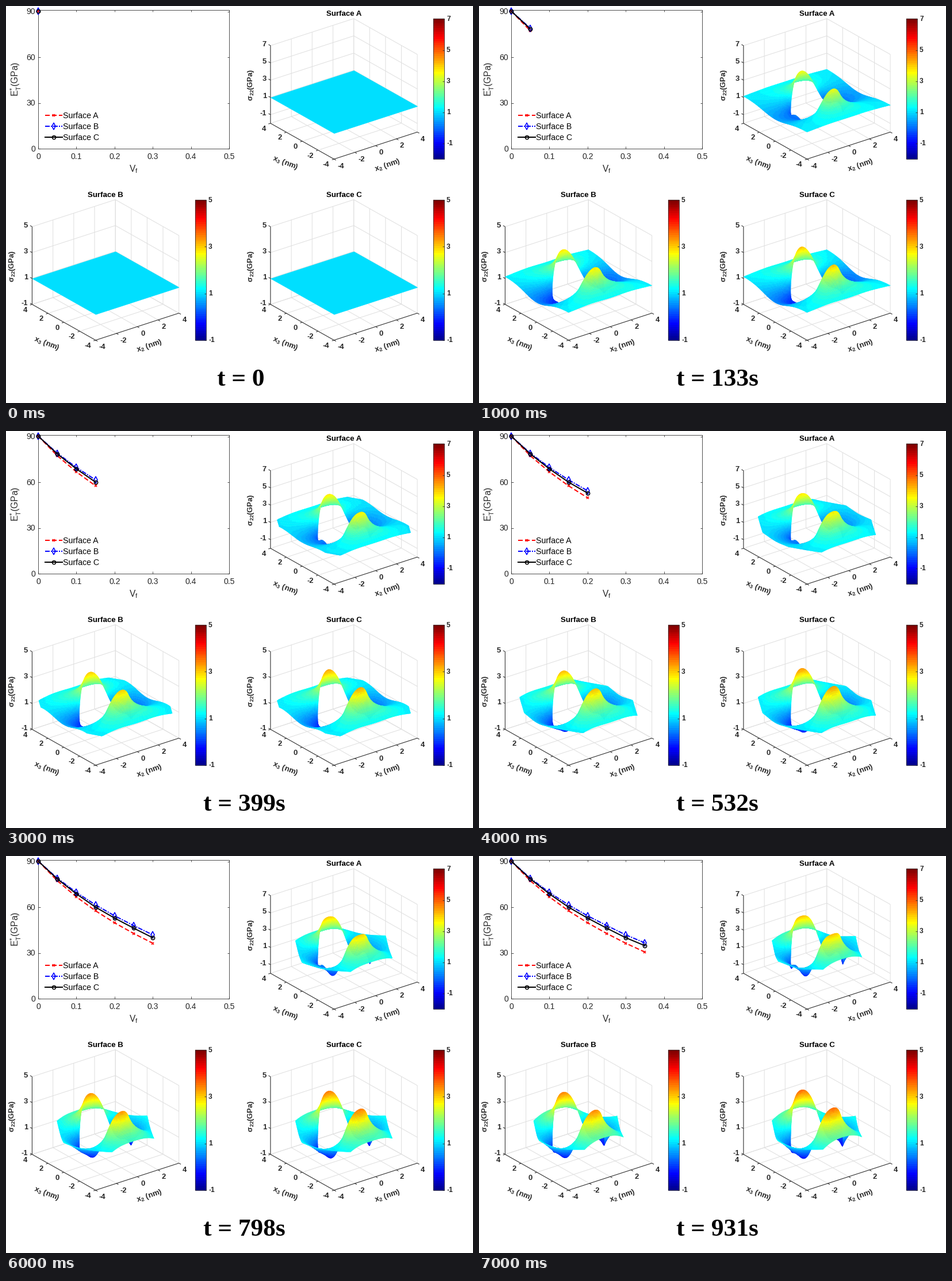
These frames come from a looping animation (812x690 px, 8 s). A matplotlib script:

```python
import numpy as np
import matplotlib.pyplot as plt
from matplotlib.animation import FuncAnimation
from matplotlib.collections import LineCollection, PolyCollection
from matplotlib.patches import Rectangle

W, H, DPI = 812, 690, 100
PT = 72 / DPI
INK, GRID = "#262626", "#dfdfdf"
STEPS = 8
HOLE = 2.0

plt.rcParams["font.family"] = "Liberation Sans"
plt.rcParams["axes.unicode_minus"] = False

# the small surplus keeps the pixel size from rounding down
fig = plt.figure(figsize=((W + 0.01) / DPI, (H + 0.01) / DPI), dpi=DPI, facecolor="white")
ax = fig.add_axes([0, 0, 1, 1])
ax.set_xlim(0, W)
ax.set_ylim(H, 0)
ax.axis("off")


def text(x, y, s, px, ha="center", va="center", **kw):
    return ax.text(x, y, s, fontsize=px * PT, ha=ha, va=va, **kw)


def segments(segs, color, px, z):
    ax.add_collection(LineCollection(segs, colors=color, linewidths=px * PT, zorder=z))


def sub(s):
    return r"$_{\mathdefault{%s}}$" % s


def jet(v):
    """64-step rainbow for v in 0..1."""
    i = (np.clip(np.floor(np.asarray(v) * 64), 0, 63) + 1) / 64
    return np.stack([np.clip(1.5 - np.abs(4 * i - c), 0, 1) for c in (3, 2, 1)], axis=-1)


# ---- stress field around a hexagonal array of holes ----

def ripple(x, y):
    """Change of the axial stress caused by one hole at the origin."""
    s = HOLE ** 2 / (x * x + y * y)
    a = np.arctan2(y, x)
    c2, c4 = np.cos(2 * a), np.cos(4 * a)
    return -s * (1.5 * c2 + c4) + 1.5 * s * s * c4


def array_stress(x, y, vf, apothem):
    total = 1 + ripple(x, y)
    for a in np.radians(np.arange(30, 390, 60)):
        total = total + ripple(x - 2 * apothem * np.cos(a), y - 2 * apothem * np.sin(a))
    return total / (1 - 0.65 * vf)


def cell_radius(a, apothem):
    """Distance to the rim of the hexagon cut by the +-4 box."""
    rim = np.full_like(a, np.inf)
    sides = [(d, apothem) for d in range(30, 390, 60)] + [(d, 4.0) for d in range(0, 360, 90)]
    for deg, dist in sides:
        c = np.cos(a - np.radians(deg))
        rim = np.minimum(rim, np.where(c > 0.05, dist / np.maximum(c, 0.05), np.inf))
    return rim


def surface(vf, rim_values):
    """Grid of x2, x3 and stress; rim_values are (base, slope) at 0, 30, 60, 90 degrees."""
    apothem = np.sqrt(np.pi * HOLE ** 2 / vf / (2 * np.sqrt(3)))
    a = np.linspace(0, 2 * np.pi, 241)[None, :]
    t = np.linspace(0, 1, 27)[:, None] ** 1.4
    r = HOLE + (cell_radius(a, apothem) - HOLE) * t
    x, y = r * np.cos(a), r * np.sin(a)

    key = np.radians([0, 30, 60, 90])
    want = np.array([b + m * vf for b, m in rim_values])
    have = array_stress(HOLE * np.cos(key), HOLE * np.sin(key), vf, apothem)
    waves = 2 * np.arange(4)
    coef = np.linalg.solve(np.cos(np.outer(key, waves)), want - have)
    fix = sum(c * np.cos(n * a) for c, n in zip(coef, waves))
    return x, y, array_stress(x, y, vf, apothem) + fix * (HOLE / r) ** 4


# ---- 3D panels ----

class Panel:
    def __init__(self, name, ox, oy, lo, hi, bar_x, label_x, rim_values):
        self.ox, self.oy, self.lo, self.hi = ox, oy, lo, hi
        self.rim_values = rim_values
        self.ticks = range(-1, hi + 1, 2)
        self.frame()
        self.labels(name)
        self.colorbar(bar_x, label_x)
        self.mesh = PolyCollection([], linewidths=0.35, zorder=3)
        ax.add_collection(self.mesh)

    def project(self, x, y, z):
        px = self.ox + 18.1 * x - 13.8 * y
        py = self.oy - 5.87 * x - 7.78 * y - (z - self.lo) * 135 / (self.hi - self.lo)
        return px, py

    def path(self, *pts):
        return [self.project(*p) for p in pts]

    def frame(self):
        lo, hi = self.lo, self.hi
        grid = []
        for v in range(-4, 5, 2):
            grid.append(self.path((v, -4, lo), (v, 4, lo), (v, 4, hi)))
            grid.append(self.path((-4, v, lo), (4, v, lo), (4, v, hi)))
        for v in self.ticks:
            grid.append(self.path((-4, 4, v), (4, 4, v), (4, -4, v)))
        segments(grid, GRID, 1, 1)

        dark = [self.path((-4, 4, hi), (-4, 4, lo), (-4, -4, lo), (4, -4, lo))]
        for v in range(-4, 5, 2):
            dark.append(self.path((v, -4, lo), (v, -4.25, lo)))
            dark.append(self.path((-4, v, lo), (-4.2, v, lo)))
        for v in self.ticks:
            dark.append(self.path((-4, 4, v), (-4, 4.25, v)))
        segments(dark, INK, 1, 2)

    def labels(self, name):
        bold = dict(weight="bold", color=INK)
        for v in range(-4, 5, 2):
            x, y = self.project(-4, v, self.lo)
            text(x - 8, y + 10, str(v), 13, ha="right", **bold)
            x, y = self.project(v, -4, self.lo)
            text(x + 6, y + 12.5, str(v), 13, ha="left", **bold)
        for v in self.ticks:
            x, y = self.project(-4, 4, v)
            text(x - 7, y - 1.5, str(v), 13, ha="right", **bold)
        x, y = self.ox, self.oy
        text(x, y - 197.5, name, 13.2, weight="bold", color="black")
        turn = dict(rotation_mode="anchor", **bold)
        text(x - 102, y + 61, "x" + sub(3) + " (nm)", 13.2, rotation=-21, **turn)
        text(x + 76, y + 65, "x" + sub(2) + " (nm)", 13.2, rotation=19, **turn)
        text(x - 162, y - 74, "σ" + sub(22) + "(GPa)", 13, rotation=90, **turn)

    def colorbar(self, x, label_x):
        top, h, w = self.oy - 189, 243.5, 19
        step = h / 64
        ys = top + h - step * np.arange(65)
        bands = [[(x, a), (x + w, a), (x + w, b), (x, b)] for a, b in zip(ys[:-1], ys[1:])]
        ax.add_collection(PolyCollection(bands, facecolors=jet((np.arange(64) + 0.5) / 64),
                                         edgecolors="face", linewidths=0.2, zorder=2))
        ax.add_patch(Rectangle((x, top), w, h, fill=False, ec=INK, lw=0.8 * PT, zorder=3))
        marks = []
        for v in self.ticks:
            y = top + h * (self.hi - v) / (self.hi - self.lo)
            marks.append([(x + w - 3, y), (x + w, y)])
            text(label_x, y + 0.5, str(v), 12, ha="left", weight="bold", color=INK)
        segments(marks, INK, 0.8, 4)

    def show(self, vf):
        if vf == 0:
            side = np.linspace(-4, 4, 2)
            x, y = np.meshgrid(side, side)
            z = np.ones_like(x)
        else:
            x, y, z = surface(vf, self.rim_values)

        def corners(m):
            return np.stack([m[:-1, :-1], m[1:, :-1], m[1:, 1:], m[:-1, 1:]], axis=-1)

        far = corners(5.87 * x + 7.78 * y).mean(-1).ravel()
        order = np.argsort(-far)
        px, py = (corners(m) for m in self.project(x, y, z))
        quads = np.stack([px, py], axis=-1).reshape(-1, 4, 2)
        level = (corners(z).mean(-1).ravel() - self.lo) / (self.hi - self.lo)
        colors = jet(level + 1e-9)
        self.mesh.set_verts(quads[order])
        self.mesh.set_facecolor(colors[order])
        self.mesh.set_edgecolor(colors[order])


panels = [
    Panel("Surface A", 587.5, 211.5, -2, 7, 743, 766,
          [(0.2, 0), (-0.25, -1.0), (1.75, 3.2), (3.43, 1.9)]),
    Panel("Surface B", 173, 526.2, -1, 5, 329, 352,
          [(0.05, -0.3), (0.15, -0.5), (1.75, 1.7), (2.78, 1.9)]),
    Panel("Surface C", 587.5, 526.2, -1, 5, 743, 766,
          [(0.0, -0.2), (0.1, -0.5), (1.8, 2.0), (2.99, 1.8)]),
]

# ---- modulus chart ----

LEFT, RIGHT, TOP, BASE = 56, 388, 7, 248


def chart_xy(vf, e):
    return LEFT + (RIGHT - LEFT) * np.asarray(vf) / 0.5, BASE - 2.648 * np.asarray(e)


def build_chart():
    ax.add_patch(Rectangle((LEFT, TOP), RIGHT - LEFT, BASE - TOP, fill=False,
                           ec=INK, lw=0.8 * PT, zorder=2))
    marks = []
    for i in range(6):
        x, _ = chart_xy(i / 10, 0)
        marks += [[(x, BASE), (x, BASE - 3.5)], [(x, TOP), (x, TOP + 3.5)]]
        text(x, 262, f"{i / 10:g}", 14, color=INK)
    for e in range(0, 91, 30):
        _, y = chart_xy(0, e)
        marks += [[(LEFT, y), (LEFT + 3.5, y)], [(RIGHT, y), (RIGHT - 3.5, y)]]
        text(51, y + 0.5, str(e), 14, ha="right", color=INK)
    segments(marks, INK, 0.8, 2)
    text(222, 284, "V" + sub("f"), 15.5, color=INK)
    text(22, 127, r"E$_{\mathdefault{T}}^{\mathdefault{*}}$(GPa)", 15.5,
         va="baseline", rotation=90, rotation_mode="anchor", color=INK)


build_chart()

CURVES = [
    ("Surface A", "red", (0, (4, 2)), "x", 4.6, [90.3, 77.4, 66.8, 57.7, 49.8, 42.8, 36.4, 30.6]),
    ("Surface B", "blue", (0, (4, 1, 1, 1)), "d", 7.8, [90.3, 79.1, 69.7, 61.6, 54.4, 48.0, 41.9, 36.6]),
    ("Surface C", "black", "-", "o", 6.2, [90.3, 78.6, 68.8, 60.1, 52.9, 46.3, 40.0, 34.8]),
]
lines = []
for row, (name, color, dash, mark, size, _) in enumerate(CURVES):
    style = dict(color=color, lw=2 * PT, marker=mark, ms=size * PT, mfc="none",
                 mec=color, mew=1.6 * PT, zorder=5 + row)
    y = 190 + 19 * row
    ax.plot([68, 83, 97.5], [y] * 3, ls=dash, markevery=[1], **style)
    text(99, y + 0.5, name, 14.1, ha="left", color="black")
    lines.append(ax.plot([], [], ls=dash, **style)[0])

clock = text(414.5, 660, "", 43.4, va="baseline", family="Liberation Serif",
             weight="bold", color="black")


def update(i):
    vf = 0.05 * i
    for panel in panels:
        panel.show(vf)
    for line, curve in zip(lines, CURVES):
        line.set_data(*chart_xy(0.05 * np.arange(i + 1), curve[-1][:i + 1]))
    clock.set_text(f"t = {133 * i}s" if i else "t = 0")
    clock.set_x(414.5 if i else 408)
    return [p.mesh for p in panels] + lines + [clock]


anim = FuncAnimation(fig, update, frames=STEPS, init_func=lambda: update(0),
                     interval=1000, repeat=True, repeat_delay=0, blit=False)
plt.show()
```
